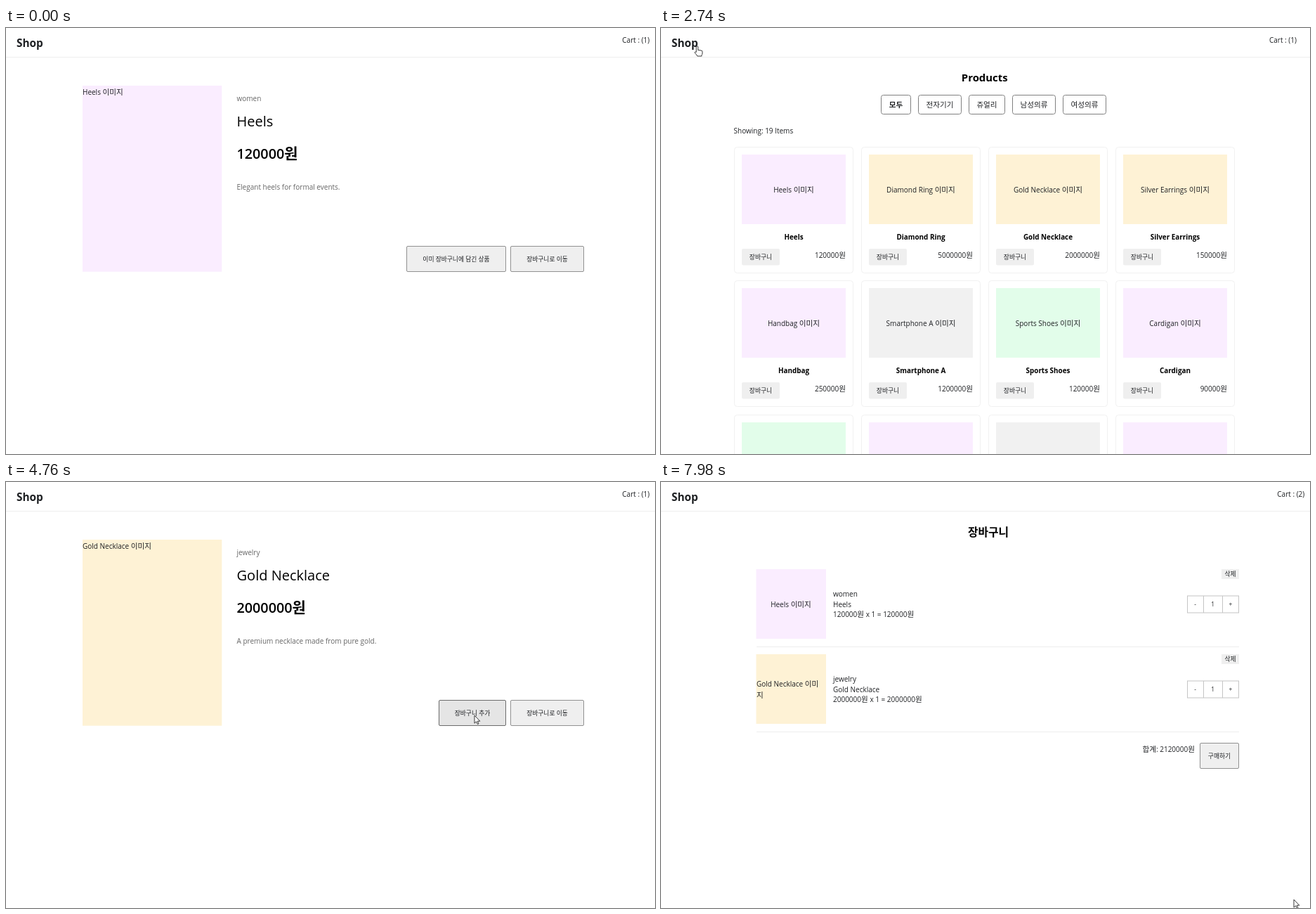
An HTML page that plays this animation: 924x606 px, repeating every 8 s.

```html
<!DOCTYPE html>
<html lang="ko">
<head>
<meta charset="utf-8">
<title>Shop</title>
<style>
  html, body { margin: 0; width: 100%; height: 100%; overflow: hidden; background: #fff; }
  svg { display: block; width: 924px; height: 606px; }
  text { font-family: "Open Sans", "Noto Sans CJK KR", "Noto Sans CJK", sans-serif; fill: #1f2124; white-space: pre; }
  .ko { font-family: "Noto Sans CJK KR", "Noto Sans CJK", sans-serif; font-size: 1.06em; }
  .btn rect { fill: #efefef; stroke: #919191; }
  .btn.hover rect { fill: #e5e5e5; stroke: #6b6b6b; }
  .scene { display: none; }
  .scene.on { display: inline; }
  #pointer path { fill: #fff; stroke: #222; stroke-width: .9; stroke-linejoin: round; }
</style>
</head>
<body>
<svg id="stage" viewBox="0 0 924 606"></svg>
<script>
const LOOP = 8000;
const PINK = '#faedff', GOLD = '#fef2d5', GREEN = '#e2fdea', GRAY = '#f1f1f1';

// Hangul runs are set slightly larger than the Latin around them.
function text(x, y, str, { size = 10, weight = 400, fill = '', anchor = 'start' } = {}) {
  const runs = str.replace(/[가-힣]+/g, run => `<tspan class="ko">${run}</tspan>`);
  return `<text x="${x}" y="${y}" font-size="${size}" font-weight="${weight}" text-anchor="${anchor}"` +
    `${fill && ` style="fill:${fill}"`}>${runs}</text>`;
}
const centered = (x, y, str, opts) => text(x, y, str, { anchor: 'middle', ...opts });
const box = (x, y, w, h, fill, r = 0) =>
  `<rect x="${x}" y="${y}" width="${w}" height="${h}" rx="${r}" fill="${fill}"/>`;
const frame = (x, y, w, h, stroke, r = 0) =>
  `<rect x="${x + .5}" y="${y + .5}" width="${w - 1}" height="${h - 1}" rx="${r}" fill="#fff" stroke="${stroke}"/>`;
const rule = (x, y, w, color) => box(x, y, w, 1, color);
const cartLink = (count, x = 877.3) => text(x, 21, `Cart : (${count})`);

function button(x, y, w, h, label) {
  return `<g class="btn" data-area="${x},${y},${w},${h}">${frame(x, y, w, h, '', 1.5)}` +
    centered(x + w / 2, y + h / 2 + 3.3, label, { size: 8.3 }) + '</g>';
}

function detailPage({ name, kind, price, info, color }, owned, count) {
  const left = owned ? 570 : 616;
  return cartLink(count) +
    box(109, 82, 198.3, 264.7, color) + text(109, 94.5, name + ' 이미지') +
    text(328.5, 104, kind, { fill: '#666' }) +
    text(328.5, 140, name, { size: 20, fill: '#000' }) +
    text(328.5, 185.6, price + '원', { size: 19.8, weight: 600, fill: '#000' }) +
    text(328.5, 229.5, info, { fill: '#666' }) +
    button(left, 310, 712 - left, 37, owned ? '이미 장바구니에 담긴 상품' : '장바구니 추가') +
    button(718, 310, 105, 37, '장바구니로 이동');
}

function card(x, y, [name, price, color]) {
  const cx = x + 85;
  return frame(x, y, 170, 180, '#f1f1f1', 4) + box(x + 11, y + 11, 148, 99, color) +
    (name ? centered(cx, y + 65, name + ' 이미지') +
      centered(cx, y + 132, name, { size: 9.9, weight: 700, fill: '#000' }) +
      box(x + 11, y + 145, 54, 23.5, '#efefef', 2) +
      centered(x + 38, y + 160.3, '장바구니', { size: 8.3 }) +
      text(x + 159, y + 158, price + '원', { anchor: 'end' }) : '');
}

function listPage() {
  const filters = [['모두', 313, 43], ['전자기기', 366, 62], ['쥬얼리', 438, 52], ['남성의류', 500, 62], ['여성의류', 572, 62]];
  const cards = [
    ['Heels', 120000, PINK], ['Diamond Ring', 5000000, GOLD], ['Gold Necklace', 2000000, GOLD], ['Silver Earrings', 150000, GOLD],
    ['Handbag', 250000, PINK], ['Smartphone A', 1200000, GRAY], ['Sports Shoes', 120000, GREEN], ['Cardigan', 90000, PINK],
    ['', 0, GREEN], ['', 0, PINK], ['', 0, GRAY], ['', 0, PINK]
  ];
  return cartLink(1, 866) +
    centered(460.7, 75.5, 'Products', { size: 14.9, weight: 700, fill: '#000' }) +
    filters.map(([label, x, w], i) => frame(x, 95, w, 28, '#808080', 3) +
      centered(x + w / 2, 113.2, label, { weight: i ? 400 : 700 })).join('') +
    text(103.5, 150, 'Showing: 19 Items') +
    cards.map((c, i) => card(104 + 181 * (i % 4), 169 + Math.round(190.4 * Math.floor(i / 4)), c)).join('');
}

function cartRow(y, { name, kind, price, color }, labels) {
  return box(135.5, y, 99.5, 99, color) + labels +
    [kind, name, `${price}원 x 1 = ${price}원`].map((s, i) => text(245, y + 39 + 14.5 * i, s)).join('') +
    box(798, y, 25, 14, '#efefef') + centered(810.5, y + 10.2, '삭제', { size: 8.3 }) +
    frame(749, y + 37.5, 74, 25, '#c4c4c4') +
    box(772, y + 38, 1, 24, '#c4c4c4') + box(799, y + 38, 1, 24, '#c4c4c4') +
    ['-', '1', '+'].map((s, i) => centered(760.5 + 25.2 * i, y + 53, s, { size: 8.4 })).join('') +
    rule(136, y + 110, 687, '#eee');
}

const heels = { name: 'Heels', kind: 'women', price: 120000, info: 'Elegant heels for formal events.', color: PINK };
const necklace = { name: 'Gold Necklace', kind: 'jewelry', price: 2000000, info: 'A premium necklace made from pure gold.', color: GOLD };

const cartPage = () => cartLink(2) +
  centered(466, 76.5, '장바구니', { size: 14.9, weight: 700, fill: '#000' }) +
  cartRow(124, heels, centered(185, 178, 'Heels 이미지')) +
  cartRow(245, necklace, text(136, 291, 'Gold Necklace 이미') + text(136, 306.5, '지')) +
  text(760, 383.5, '합계: 2120000원', { anchor: 'end' }) + button(767, 371, 56, 37, '구매하기');

const scenes = [
  [0, detailPage(heels, true, 1)],
  [2350, listPage()],
  [3680, detailPage(necklace, false, 1)],
  [5080, detailPage(necklace, true, 2)],
  [6290, cartPage()]
];

const stage = document.getElementById('stage');
stage.innerHTML = box(0, 0, 924, 606, '#fff') +
  text(15, 27, 'Shop', { size: 15.4, weight: 700 }) + rule(0, 41, 924, '#eee') +
  scenes.map(([, body]) => `<g class="scene">${body}</g>`).join('') +
  `<g id="pointer">
    <circle id="click" r="8.6" fill="#ff0" fill-opacity=".68"/>
    <path id="arrow" d="M0 0V11.2L2.6 8.8L4.4 12.6L6 11.9L4.3 8.2H7.8Z"/>
    <path id="hand" d="M-1.4 9V1.6a1.3 1.3 0 0 1 2.6 0V6.2q1.1-.9 2.2.2q1.1-.8 2 .3q1.7-.5 1.9 1.2v2.6q0 1.6-1 2.6v1.4h-6.2q-.8-2-3.2-4.2q-1-1.2 0-1.8q1-.3 1.7.5z"/>
  </g>`;

const [pointer, click, arrow, hand] = ['pointer', 'click', 'arrow', 'hand'].map(id => document.getElementById(id));
const groups = [...document.querySelectorAll('.scene')];
const buttons = [...document.querySelectorAll('.btn')];

const easeOut = u => u * (1.6 - .6 * u);
const easeInOut = u => u * u * (3 - 2 * u);

// Pointer moves: start, end, redraws, easing, Bézier points.
const moves = [
  [190, 930, 12, easeOut, [[932, 575], [620, 130], [123, 44]]],
  [1000, 1420, 7, easeOut, [[123, 44], [-40, 20], [33, 22]]],
  [2740, 3340, 10, easeInOut, [[33, 22], [250, 60], [610, 225], [540, 226]]],
  [4080, 4760, 10, easeInOut, [[540, 226], [590, 310], [667, 332]]],
  [5410, 6090, 10, easeInOut, [[667, 332], [760, 230], [990, 20], [891, 18]]],
  [6950, 7230, 5, easeInOut, [[891, 18], [915, 120], [890, 242]]],
  [7430, 7980, 9, easeInOut, [[890, 242], [886, 420], [901, 594]]]
];
const clicks = [[2220, 2350], [3610, 3680], [4950, 5080], [6160, 6290]];

function bezier(points, u) {
  while (points.length > 1) {
    points = points.slice(1).map(([x, y], i) => [
      points[i][0] + (x - points[i][0]) * u,
      points[i][1] + (y - points[i][1]) * u
    ]);
  }
  return points[0];
}

function pointerAt(t) {
  const move = moves.findLast(m => t >= m[0]);
  if (!move) return moves[0][4][0];
  const [start, end, steps, ease, points] = move;
  const step = Math.min(steps, 1 + Math.floor((t - start) / (end - start) * (steps - 1)));
  return bezier(points, ease(step / steps));
}

const inside = (x, y, [left, top, w, h]) => x >= left && x < left + w && y >= top && y < top + h;
const show = (el, on) => { el.style.display = on ? 'inline' : 'none'; };

function draw(t) {
  const current = scenes.findLastIndex(([start]) => t >= start);
  const [x, y] = pointerAt(t);
  const onLink = inside(x, y, [15, 10, 38, 23]) || inside(x, y, [866, 10, 52, 15]) ||
    (current === 1 && inside(x, y, [104, 169, 714, 437]));
  groups.forEach((g, i) => g.classList.toggle('on', i === current));
  buttons.forEach(b => b.classList.toggle('hover', inside(x, y, b.dataset.area.split(',').map(Number))));
  pointer.setAttribute('transform', `translate(${x.toFixed(1)} ${y.toFixed(1)})`);
  show(hand, onLink);
  show(arrow, !onLink);
  show(click, clicks.some(([from, to]) => t >= from && t < to));
}

function tick() {
  draw(performance.now() % LOOP);
  requestAnimationFrame(tick);
}
tick();
</script>
</body>
</html>
```
